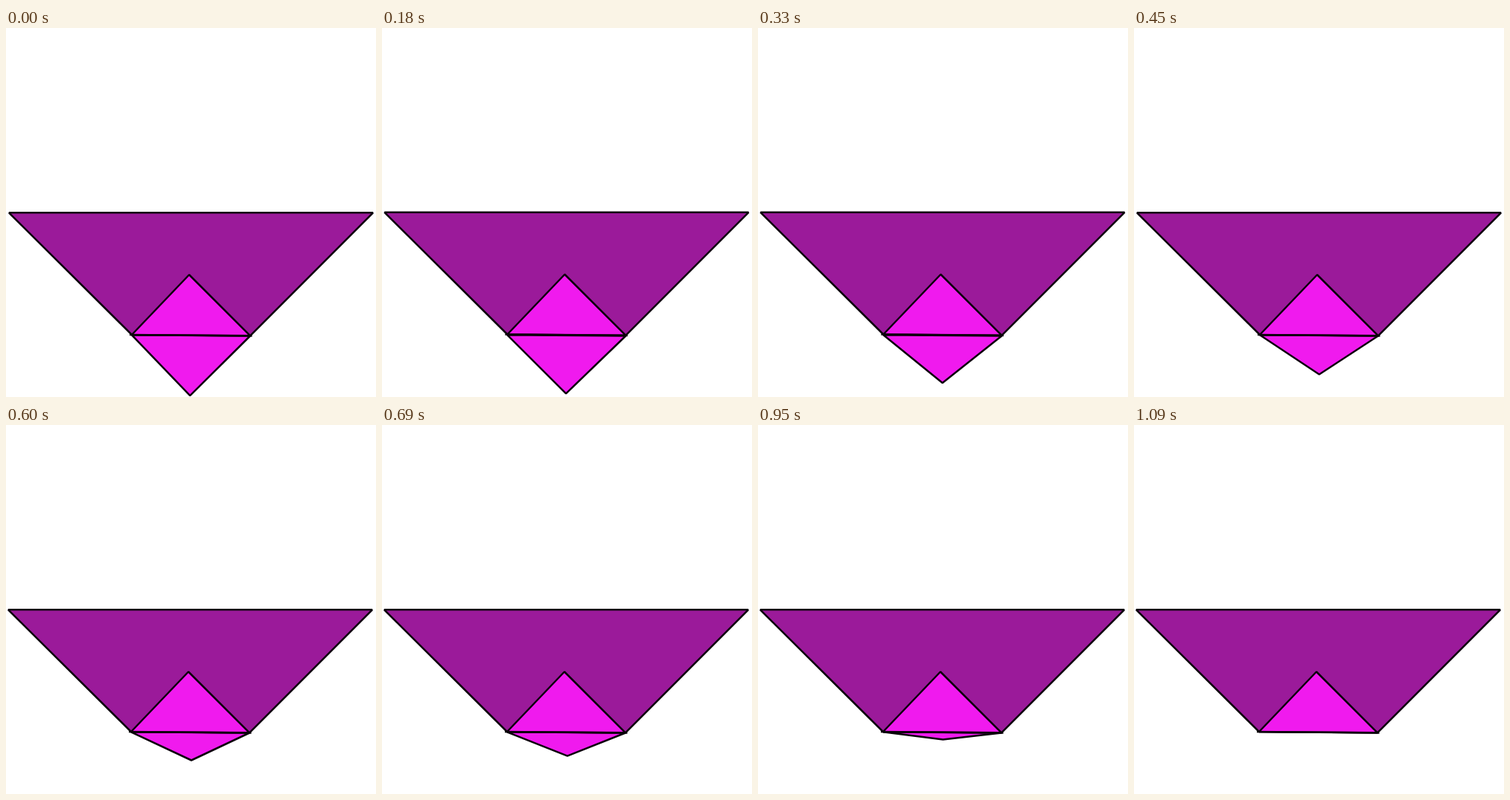
Recreate the animation shown at these times as an HTML page. Size 500 px wide and 498 px high, loop 1550 ms.

```html
<!DOCTYPE html>
<html lang="en">
<head>
<meta charset="utf-8">
<title>Folding triangle</title>
<style>
  html, body { margin: 0; width: 100%; height: 100%; overflow: hidden; background: #fff; }
  svg { display: block; width: 500px; height: 498px; }
  polygon, line { stroke: #0a000a; stroke-width: 2.5; stroke-linejoin: bevel; }
  .paper { fill: #9b1a9a; }
  .fold { fill: #f01aee; }
</style>
</head>
<body>
<svg viewBox="0 0 500 498">
  <g id="sheet">
    <polygon class="paper" points="4,249.3 496,249.3 330,415.3 170,414"/>
  </g>
  <polygon id="flap" class="fold"/>
  <g id="front">
    <polygon class="fold" points="170,414 247.5,333 330,415.3"/>
    <line x1="167" y1="414" x2="332.5" y2="415.5"/>
  </g>
</svg>
<script>
const LOOP = 1550, LAST = 38;
const sheet = document.getElementById('sheet');
const front = document.getElementById('front');
const flap = document.getElementById('flap');

// [step, x, y] of the flap's tip
const tips = [
  [0, 248.7, 496.2], [3, 248.5, 487.5], [10, 250.3, 467.5], [15, 250.5, 452.5],
  [23, 250.5, 437], [31, 250, 424.5], [38, 250, 415.5]
];

// Steps of 30 ms, then of 20 ms, with a hold at both ends
function stepAt(t) {
  if (t < 180) return 0;
  if (t < 710) return Math.min(18, 1 + Math.floor((t - 180) / 30));
  return Math.min(LAST, 19 + Math.floor((t - 710) / 20));
}

function tipAt(step) {
  const i = Math.max(1, tips.findIndex(p => p[0] >= step));
  const [a, b] = [tips[i - 1], tips[i]];
  const k = (step - a[0]) / (b[0] - a[0]);
  return [a[1] + (b[1] - a[1]) * k, a[2] + (b[2] - a[2]) * k];
}

// Slight wobble of the whole sheet
function shiftAt(step) {
  if (step >= 1 && step <= 6) return [-0.6, -0.5];
  return step > 12 ? [-1, 0] : [0, 0];
}

let shown = -1;
function draw(now) {
  const step = stepAt(now % LOOP);
  if (step !== shown) {
    shown = step;
    const [dx, dy] = shiftAt(step);
    for (const part of [sheet, front]) part.setAttribute('transform', `translate(${dx} ${dy})`);
    const [x, y] = tipAt(step);
    flap.setAttribute('points', `${170 + dx},414.3 ${x},${y} ${330 + dx},415.5`);
    flap.style.display = step === LAST ? 'none' : '';
  }
}

const start = performance.now();
function tick() {
  draw(performance.now() - start);
  requestAnimationFrame(tick);
}
tick();
</script>
</body>
</html>
```
